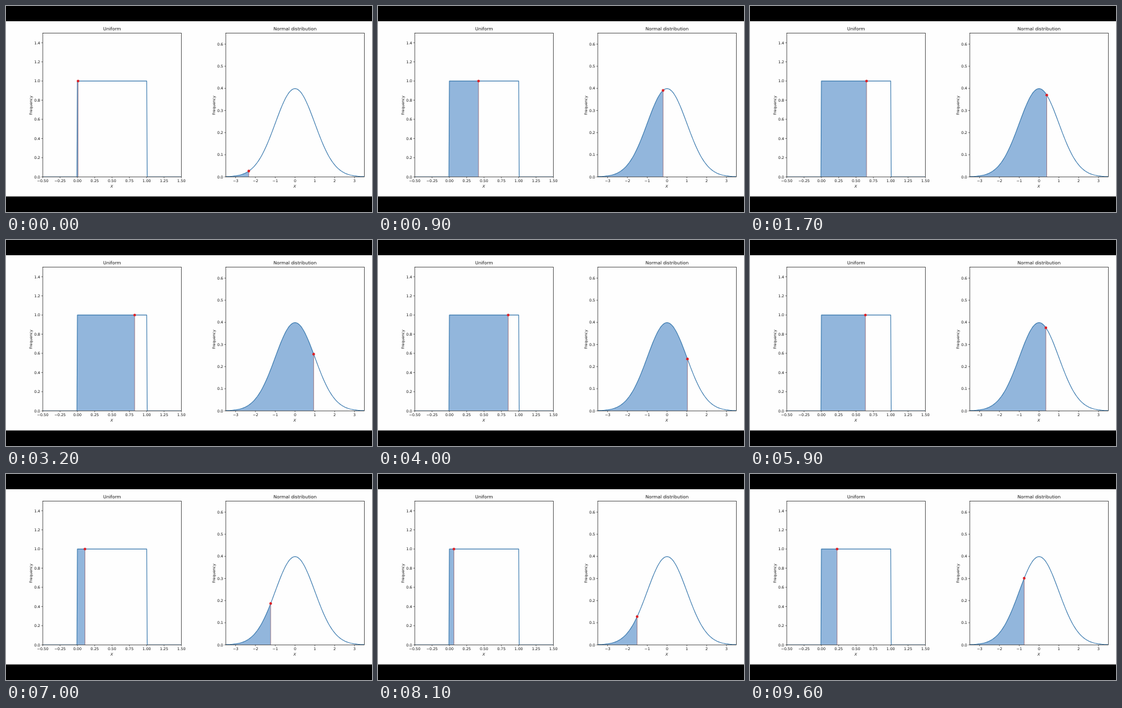
Write an HTML page with a canvas that moves like this. It is 600 by 338 pixels and loops after 9700 ms.

```html
<!DOCTYPE html>
<html lang="en">
<head>
<meta charset="utf-8">
<title>Uniform and normal samples</title>
<style>
html, body { margin: 0; width: 100%; height: 100%; overflow: hidden; background: #000; }
canvas { display: block; width: 600px; height: 338px; }
</style>
</head>
<body>
<canvas id="stage"></canvas>
<script>
const W = 600, H = 338, LOOP = 9700;
const FONT = '"DejaVu Sans", Verdana, sans-serif';
const INK = '#141414', CURVE = '#3878ad', FILL = '#92b6dc', RED = '#dc2127';

// Each draw is [start time in ms, z score]; it holds until the next one.
const draws = [
  [0, -2.335], [100, 0.12], [700, -0.2], [1200, 1.645], [1700, 0.39],
  [2300, 0.2], [2800, 0.94], [3300, -0.065], [3800, 1.03], [4300, 0.48],
  [4900, -0.41], [5400, 0.69], [5900, 0.345], [6400, -1.37], [6900, -1.23],
  [7500, 0], [8000, -1.51], [8500, 1.95], [9000, 1.395], [9500, -0.75]
];

const pdf = z => Math.exp(-z * z / 2) / Math.sqrt(2 * Math.PI);

// Polynomial approximation of the normal distribution function
function cdf(z) {
  const t = 1 / (1 + 0.2316419 * Math.abs(z));
  const poly = t * (0.31938153 + t * (-0.356563782 +
    t * (1.781477937 + t * (-1.821255978 + t * 1.330274429))));
  const tail = pdf(z) * poly;
  return z > 0 ? 1 - tail : tail;
}

const EDGE = 0.007;
function box(x) {
  const rise = (x + EDGE) / EDGE, fall = (1 + EDGE - x) / EDGE;
  return Math.max(0, Math.min(1, rise, fall));
}

const range = (from, to, step) => {
  const out = [];
  for (let i = 0; from + i * step <= to + 1e-9; i++) out.push(from + i * step);
  return out;
};

const TOP = 44.5, BOTTOM = 280.3, WIDTH = 227.3;
const plots = [
  { title: 'Uniform', left: 60.2, x0: -0.5, x1: 1.5, yMax: 1.5, f: box,
    xs: range(-0.5, 1.5, 0.25), ys: range(0, 1.4, 0.2), digits: 2,
    knots: [-0.5, -EDGE, 0, 1, 1 + EDGE, 1.5], value: cdf },
  { title: 'Normal distribution', left: 360.2, x0: -3.5, x1: 3.5, yMax: 0.65, f: pdf,
    xs: range(-3, 3, 1), ys: range(0, 0.6, 0.1), digits: 0,
    knots: range(-3.5, 3.5, 0.05), value: z => z }
];

const canvas = document.getElementById('stage');
const ratio = window.devicePixelRatio || 1;
canvas.width = Math.round(W * ratio);
canvas.height = Math.round(H * ratio);
const ctx = canvas.getContext('2d');
ctx.scale(ratio, ratio);

const px = (p, x) => p.left + (x - p.x0) / (p.x1 - p.x0) * WIDTH;
const py = (p, y) => BOTTOM - y / p.yMax * (BOTTOM - TOP);

function label(text, x, y, size, align = 'center', style = '') {
  ctx.font = `${style} ${size}px ${FONT}`;
  ctx.textAlign = align;
  ctx.fillStyle = INK;
  ctx.fillText(text, x, y);
}

function line(x1, y1, x2, y2, color, width) {
  ctx.beginPath();
  ctx.moveTo(x1, y1);
  ctx.lineTo(x2, y2);
  ctx.strokeStyle = color;
  ctx.lineWidth = width;
  ctx.stroke();
}

function trace(p, end) {
  ctx.beginPath();
  for (const x of p.knots) if (x < end) ctx.lineTo(px(p, x), py(p, p.f(x)));
  ctx.lineTo(px(p, end), py(p, p.f(end)));
}

function axes(p) {
  ctx.strokeStyle = INK;
  ctx.lineWidth = 0.7;
  ctx.strokeRect(p.left, TOP, WIDTH, BOTTOM - TOP);
  for (const x of p.xs) {
    const sx = px(p, x);
    line(sx, BOTTOM, sx, BOTTOM + 2.2, INK, 0.6);
    label(x.toFixed(p.digits).replace('-', '\u2212'), sx, 289, 6.15);
  }
  for (const y of p.ys) {
    const sy = py(p, y);
    line(p.left - 2.2, sy, p.left, sy, INK, 0.6);
    label(y.toFixed(1), p.left - 4.2, sy + 2.3, 6.15, 'right');
  }
  const mid = p.left + WIDTH / 2;
  label(p.title, mid, 40.4, 7.35);
  label('X', mid - 0.6, 298.2, 6.15, 'center', 'italic');
  ctx.save();
  ctx.translate(p.left - 17, (TOP + BOTTOM) / 2 + 0.6);
  ctx.rotate(-Math.PI / 2);
  label('Frequency', 0, 0, 6.15);
  ctx.restore();
}

function plot(p, z) {
  const x = p.value(z), sx = px(p, x), sy = py(p, p.f(x));
  ctx.save();
  ctx.beginPath();
  ctx.rect(p.left, TOP, WIDTH, BOTTOM - TOP);
  ctx.clip();

  trace(p, x);
  ctx.lineTo(sx, BOTTOM);
  ctx.lineTo(p.left, BOTTOM);
  ctx.fillStyle = FILL;
  ctx.fill();

  trace(p, p.x1);
  ctx.strokeStyle = CURVE;
  ctx.lineWidth = 1.1;
  ctx.lineJoin = 'round';
  ctx.stroke();
  line(sx, sy, sx, BOTTOM, 'rgba(130, 65, 75, 0.85)', 0.7);
  ctx.restore();

  axes(p);
  ctx.beginPath();
  ctx.arc(sx, sy, 2.2, 0, 2 * Math.PI);
  ctx.fillStyle = RED;
  ctx.fill();
}

function render(now) {
  const t = now % LOOP;
  let z = draws[0][1];
  for (const [start, value] of draws) if (t >= start) z = value;
  ctx.fillStyle = '#000';
  ctx.fillRect(0, 0, W, H);
  ctx.fillStyle = '#fefefe';
  ctx.fillRect(0, 25, W, 287.5);
  for (const p of plots) plot(p, z);
}

const begin = performance.now();
function tick() {
  render(performance.now() - begin);
  requestAnimationFrame(tick);
}
tick();
</script>
</body>
</html>
```
